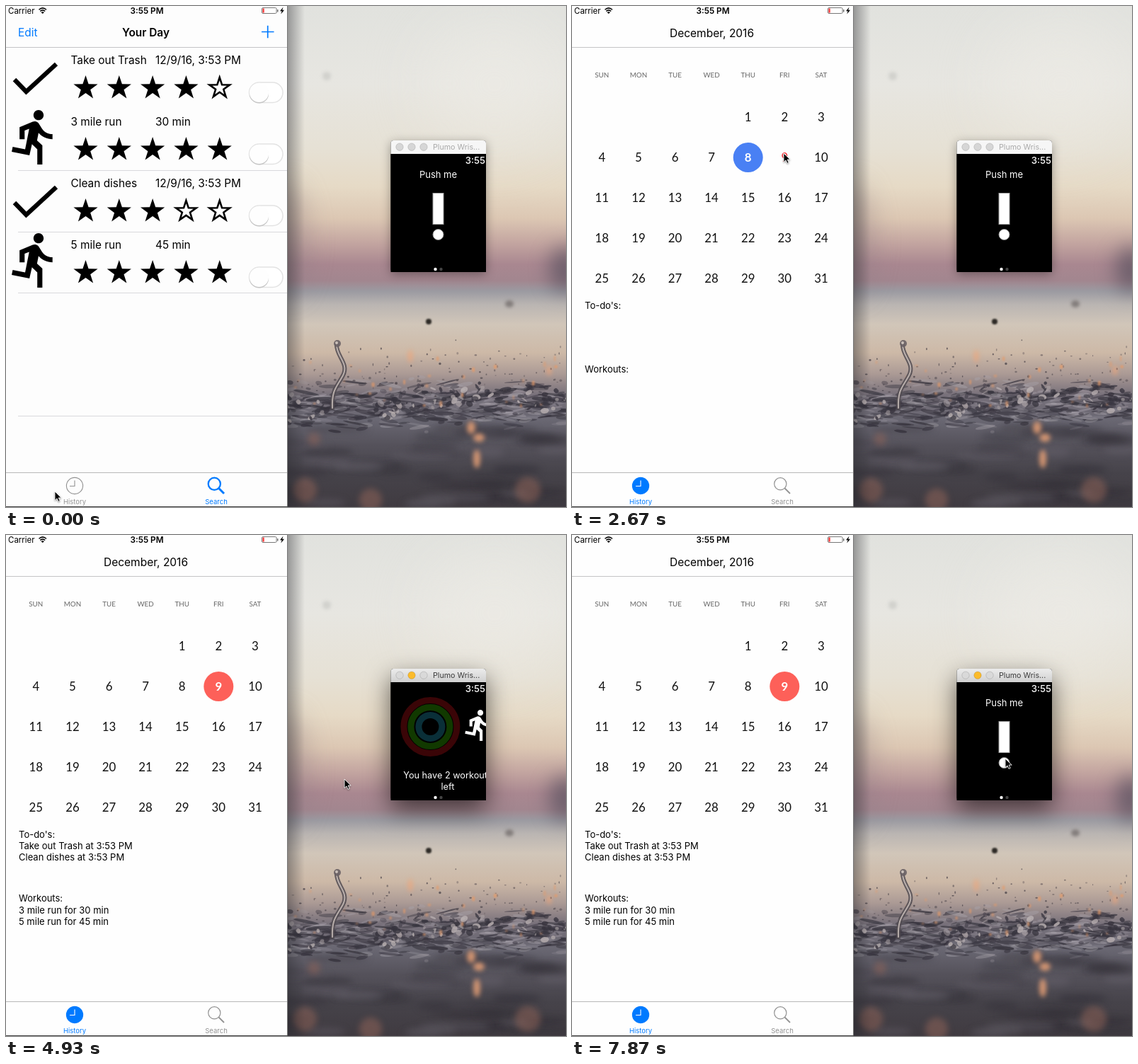
An HTML page with a canvas that plays this animation: 791 by 708 pixels, repeating every 7990 ms.

```html
<!DOCTYPE html>
<html lang="en">
<head>
<meta charset="utf-8">
<title>Day planner with watch</title>
<style>
html, body { margin: 0; width: 100%; height: 100%; overflow: hidden; }
canvas, svg { position: absolute; left: 0; top: 0; }
svg { font-family: Inter, "Liberation Sans", sans-serif; }
.mid { text-anchor: middle; }
.cal { font-family: Lato, sans-serif; }
#frame { filter: drop-shadow(0 3px 7px rgba(0,0,0,.35)); }
.active #frame { filter: drop-shadow(0 13px 17px rgba(0,0,0,.6)); }
.active #on, #off { display: inline; }
#on, .active #off { display: none; }
#cursor { filter: drop-shadow(0 1px 1px rgba(0,0,0,.4)); }
</style>
</head>
<body>
<canvas id="photo" width="791" height="708"></canvas>
<svg id="stage" width="791" height="708" viewBox="0 0 791 708"></svg>
<script>
const LOOP = 7990, PAGE = 134;
const BLUE = '#007aff', GREY = '#929292';
const $ = id => document.getElementById(id);

// ---------- backdrop ----------
function paintPhoto() {
  const c = $('photo').getContext('2d');
  let seed = 11;
  const rnd = (a = 0, b = 1) => {
    seed = (seed * 16807) % 2147483647;
    return a + (b - a) * seed / 2147483647;
  };
  const blob = (x, y, rx, ry, color, alpha = 1, blur = 0, turn = 0) => {
    c.globalAlpha = alpha;
    c.filter = blur ? `blur(${blur}px)` : 'none';
    c.fillStyle = color;
    c.beginPath();
    c.ellipse(x, y, rx, ry, turn, 0, 7);
    c.fill();
  };
  const sky = c.createLinearGradient(0, 0, 0, 708);
  [[0, '#e1e2de'], [110, '#e7e6e1'], [200, '#e6e1d5'], [255, '#e6dac6'], [300, '#dcc7b3'],
   [335, '#c3a5a0'], [365, '#a98790'], [388, '#a2868f'], [403, '#9b9aa1'], [422, '#bab5b2'],
   [450, '#d1c6b9'], [490, '#cdb9a7'], [520, '#ab9a95'], [550, '#77707a'], [585, '#696772'],
   [620, '#55525b'], [660, '#46434a'], [708, '#403b41']]
    .forEach(([y, color]) => sky.addColorStop(y / 708, color));
  c.fillStyle = sky;
  c.fillRect(397, 0, 394, 708);

  blob(690, 110, 100, 90, '#efeee8', .5, 40);
  blob(790, 372, 22, 32, '#59505e', .75, 14);
  blob(400, 330, 25, 80, '#8a7880', .4, 18);
  blob(453, 99, 6, 6, '#cfcfcb', .9, 2);
  blob(711, 421, 6, 5, '#77716f', .8, 2);
  blob(597, 446, 4, 4, '#2d2a26', 1, 1);

  // rippled water, denser and darker toward the splash line
  for (let i = 0; i < 380; i++) {
    const y = 565 + 38 * (rnd() + rnd() - 1) + rnd(-6, 6);
    const dark = rnd() < .62;
    blob(rnd(398, 791), y, rnd(3, 20), rnd(1, 3.2), dark ? '#35323c' : '#aaa5ad',
         dark ? rnd(.3, .75) : rnd(.15, .45), 0, rnd(-.25, .25));
  }
  for (let i = 0; i < 45; i++)
    blob(rnd(398, 791), rnd(595, 708), rnd(20, 55), rnd(3, 8), i % 3 ? '#302d35' : '#6b6771', rnd(.2, .45), 5);

  // splash mounds
  [[412, 565, 45], [540, 562, 22], [590, 552, 45], [655, 545, 30], [755, 550, 38]].forEach(([x, y, w]) => {
    for (let i = 0; i < 26; i++) {
      const dx = rnd(-1, 1);
      blob(x + dx * w, y + rnd(-22, 18) * (1 - dx * dx) + 5, rnd(1, 6), rnd(1, 4),
           i % 3 ? '#37343e' : '#b9b0b1', rnd(.4, .85), 0, rnd(-1, 1));
    }
  });
  // droplets and warm sparks
  for (let i = 0; i < 120; i++)
    blob(rnd(398, 791), 555 - 75 * rnd() * rnd() - rnd(0, 35), rnd(.6, 2), rnd(.6, 2), '#4b444a', rnd(.3, .8));
  for (let i = 0; i < 32; i++)
    blob(rnd(398, 791), rnd(490, 565), rnd(1, 2.6), rnd(1, 4), '#e89a66', rnd(.35, .75), 1);

  // rising jet
  c.filter = 'none';
  c.lineCap = 'round';
  [['#514a50', 6], ['#c9bfba', 2]].forEach(([color, w]) => {
    c.globalAlpha = .85;
    c.strokeStyle = color;
    c.lineWidth = w;
    c.stroke(new Path2D('M467 478C466 495 485 505 476 522S460 542 461 568'));
  });
  blob(468, 477, 5, 5, '#6a6265', .9);
  blob(467, 476, 2, 2, '#d6cbc3', .9);

  [[657, 596, 6, 9], [668, 610, 8, 6], [665, 640, 5, 13], [571, 495, 3, 9], [767, 515, 3, 7]]
    .forEach(([x, y, rx, ry]) => blob(x, y, rx, ry, '#f0a578', .8, 3));
  [[422, 684, 17], [515, 698, 16], [737, 684, 18], [435, 612, 9]]
    .forEach(([x, y, r]) => blob(x, y, r, r, '#94665a', .5, 4));

  // shade cast by the phone window
  c.globalAlpha = 1;
  c.filter = 'none';
  const shade = c.createLinearGradient(397, 0, 422, 0);
  shade.addColorStop(0, 'rgba(40,40,45,.42)');
  shade.addColorStop(1, 'rgba(40,40,45,0)');
  c.fillStyle = shade;
  c.fillRect(397, 0, 25, 708);
}

// ---------- markup helpers ----------
const range = n => [...Array(n).keys()];
const text = (x, y, s, size, attrs = '') => `<text x="${x}" y="${y}" font-size="${size}" ${attrs}>${s}</text>`;
const mid = (x, y, s, size, attrs = '') => text(x, y, s, size, `text-anchor="middle" ${attrs}`);
const path = (d, attrs = '') => `<path d="${d}" ${attrs}/>`;
const line = (d, color, w) => path(d, `fill="none" stroke="${color}" stroke-width="${w}"`);
const rect = (x, y, w, h, attrs = '') => `<rect x="${x}" y="${y}" width="${w}" height="${h}" ${attrs}/>`;
const circle = (x, y, r, attrs = '') => `<circle cx="${x}" cy="${y}" r="${r}" ${attrs}/>`;
const group = (id, s) => `<g id="${id}">${s}</g>`;

const runner = (x, y, k, color) => path('M13.49 5.48c1.1 0 2-.9 2-2s-.9-2-2-2-2 .9-2 2 .9 2 2 2zm-3.6 13.9l1-4.4 2.1 2v6h2v-7.5l-2.1-2 .6-3c1.3 1.5 3.3 2.5 5.5 2.5v-2c-1.9 0-3.5-1-4.3-2.4l-1-1.6c-.4-.6-1-1-1.7-1-.3 0-.5.1-.8.1l-5.2 2.2v4.7h2v-3.4l1.8-.7-1.6 8.1-4.9-1-.4 2 7 1.4z',
  `transform="translate(${x} ${y}) scale(${k})" fill="${color}"`);

function star(x, y, full) {
  const R = full ? 18 : 15;
  const pts = range(10).map(i => {
    const a = i * Math.PI / 5, r = i % 2 ? R * .39 : R;
    return (x + r * Math.sin(a)).toFixed(1) + ',' + (y - r * Math.cos(a)).toFixed(1);
  });
  return `<polygon points="${pts.join(' ')}" ${full ? '' : 'fill="#fff" stroke="#000" stroke-width="2.6"'}/>`;
}

function tabs(history) {
  const [h, s] = history ? [BLUE, GREY] : [GREY, BLUE];
  return line('M0 659.5H397', '#b8b8b8', 1) +
    circle(97, 678, 11.6, `fill="${history ? BLUE : 'none'}" stroke="${h}" stroke-width="1.1"`) +
    line('M97 670.5V678.5H90', history ? '#fff' : GREY, 1.1) +
    circle(294.3, 675.3, 8.6, `fill="none" stroke="${s}" stroke-width="${history ? 1.2 : 2.3}"`) +
    line('M300.5 681.5L308 689', s, history ? 1.8 : 3) +
    mid(97, 704, 'History', 9.5, `fill="${h}"`) + mid(297, 704, 'Search', 9.5, `fill="${s}"`);
}

function row(i, [title, detail, score, run]) {
  const y = 87 * i;
  return (run ? runner(-2.3, y + 54.7, 3.58, '#000') : line(`M12 ${y + 104}L28.5 ${y + 121}L71 ${y + 82}`, '#000', 6.3)) +
    text(91.5, y + 82, title, 15.4) + text(211, y + 82, detail, 15.4) +
    range(5).map(s => star(112.5 + 47.3 * s, y + 116, s < score)).join('') +
    rect(343.5, y + 108, 47.5, 28.5, 'rx="14.2" fill="#fff" stroke="#e3e3e3" stroke-width="1.5"') +
    circle(357.5, y + 124, 13.6, 'fill="#c4c4c4"') + circle(357.5, y + 122.3, 13.6, 'fill="#fefefe"');
}

const list = rect(0, 0, 397, 708, 'fill="#fdfdfd"') +
  text(17, 42.5, 'Edit', 15.4, `fill="${BLUE}"`) +
  mid(197.5, 42.5, 'Your Day', 15.4, 'font-weight="600"') +
  line('M361 36.5H378.5M369.7 27.7V45.3', BLUE, 1.7) +
  [['Take out Trash', '12/9/16, 3:53 PM', 4], ['3 mile run', '30 min', 5, 1],
   ['Clean dishes', '12/9/16, 3:53 PM', 3], ['5 mile run', '45 min', 5, 1]].map((r, i) => row(i, r)).join('') +
  [232, 319, 405, 579].map(y => line(`M17 ${y + .5}H397`, '#d9d9dc', 1)).join('') + tabs(false);

const col = c => 42.3 + 51.6 * c;
function month(picked) {
  return range(31).map(i => {
    const d = i + 1, x = col((i + 4) % 7), y = 157 + 57 * Math.floor((i + 4) / 7), on = d === picked;
    const color = on ? '#fff' : d === 9 ? '#fb2d33' : '#111';
    return (on ? circle(x, y, 21, `fill="${d === 9 ? '#fd6059' : '#4980f4'}"`) : '') +
      mid(x, y + 6, d, 16.8, `class="cal" fill="${color}" ${on ? 'font-weight="700"' : ''}`);
  }).join('');
}
const calendar = rect(0, 0, 397, 708, 'fill="#fefefe"') +
  mid(197.5, 43.5, 'December, 2016', 15.5) +
  ['SUN', 'MON', 'TUE', 'WED', 'THU', 'FRI', 'SAT'].map((d, i) => mid(col(i), 100.5, d, 9.8, 'class="cal" fill="#666"')).join('') +
  text(18, 427.5, "To-do's:", 13) + text(18, 518, 'Workouts:', 13) +
  group('day8', month(8)) +
  group('day9', month(9) + text(18, 444, 'Take out Trash at 3:53 PM', 13) + text(18, 460, 'Clean dishes at 3:53 PM', 13) +
    text(18, 535, '3 mile run for 30 min', 13) + text(18, 551, '5 mile run for 45 min', 13)) + tabs(true);

const status = text(3, 11, 'Carrier', 11.5) + mid(199, 11, '3:55 PM', 11.8, 'font-weight="600"') +
  line('M46.5 5.2Q51.7 .6 57 5.2M48.3 7.4Q51.7 4.4 55.2 7.4', '#000', 1.5) + path('M49.6 9L51.7 11L53.9 9Q51.7 7.2 49.6 9') +
  rect(361.5, 2.5, 20.5, 8, 'rx="1.5" fill="#fff" stroke="#777"') + rect(362.5, 3.5, 2.2, 6, 'fill="#f33"') +
  rect(383, 5, 1.5, 3.5, 'fill="#777"') + path('M391.5 1.5L387 7.2H389.6L388.3 11.5L393 5.7H390.2Z') +
  line('M0 58.5H397', '#c4c4c6', 1) + line('M397.5 0V708', '#777', 1) + line('M0 707.5H398', '#444', 1);

const bar = (fill, buttons, color) => path('M543.5 209V194Q543.5 190 547.5 190H674Q678 190 678 194V209Z', `fill="${fill}"`) +
  buttons.map((b, i) => circle(556 + 17 * i, 199.2, 5.2, `fill="${b}" stroke="rgba(0,0,0,.13)"`)).join('') +
  text(603, 203, 'Plumo Wris...', 10.7, `fill="${color}"`);
const ring = (r, color, w) => circle(586, 272, r, `fill="none" stroke="${color}" stroke-width="${w}"`);
const watch = rect(543.5, 190, 134.5, 186, 'id="frame" rx="4"') +
  group('off', bar('#f6f6f6', ['#d6d6d6', '#d6d6d6', '#d6d6d6'], '#a9a9a9')) +
  group('on', bar('url(#metal)', ['#d9d9d9', '#fbbb2b', '#d9d9d9'], '#3c3c3c')) +
  rect(543.5, 209, 134.5, 167) +
  '<g clip-path="url(#screen)" fill="#fff">' +
  group('push', mid(610.5, 243, 'Push me', 13) +
    rect(603, 264.5, 15, 44, 'stroke="#999"') + circle(610.5, 323, 7.5, 'stroke="#999"')) +
  group('rings', ring(37.5, '#3a0507', 9) + ring(27.5, '#113900', 9) + ring(16.5, '#0a2f38', 9) +
    runner(629, 245, 2.05, '#fff') + mid(610.5, 345, 'You have 2 workouts', 12.7) + mid(610.5, 361, 'left', 12.7)) +
  text(677, 223, '3:55', 13.2, 'text-anchor="end" font-weight="500"') +
  circle(606.5, 372, 2.2, 'id="dot0"') + circle(614.5, 372, 2.2, 'id="dot1"') + '</g>';

$('stage').innerHTML = `<defs>
  <clipPath id="screen">${rect(543.5, 209, 134.5, 167)}</clipPath>
  <linearGradient id="metal" x2="0" y2="1"><stop stop-color="#ececec"/><stop offset="1" stop-color="#d0d0d0"/></linearGradient>
  </defs>` + group('list', list) + group('calendar', calendar) + status + group('watch', watch) +
  path('M0 0V12.6L3 9.9L5 14.4L7.2 13.4L5.2 9H9.2Z', 'id="cursor" stroke="#fff" stroke-width=".9"');

// ---------- motion ----------
// screen refreshes: first time, last time, count
const bursts = [[110, 110, 1], [310, 430, 2], [720, 1490, 8], [1610, 2080, 5], [2290, 2520, 3], [2670, 3380, 7],
  [3500, 3820, 4], [3970, 4440, 5], [4580, 5280, 7], [5400, 6090, 7], [6210, 6570, 4], [6810, 7520, 7], [7640, 7870, 3]];
function refresh(t) {
  const b = bursts.filter(b => b[0] <= t).pop();
  if (!b) return 0;
  const [from, to, n] = b, step = (to - from) / (n - 1) || 1;
  return from + step * Math.min(n - 1, Math.floor((t - from) / step));
}

const pointer = [[0, 69, 686], [110, 91, 675], [720, 92, 672], [940, 264, 243], [1070, 276, 247], [1490, 21, 428],
  [1850, 60, 538], [2080, 250, 168], [2290, 247, 209], [2520, 247, 211], [2670, 299, 208], [2905, 299, 208],
  [3380, 606, 300], [3740, 615, 202], [4200, 652, 300], [4440, 623, 345], [4580, 623, 345], [4930, 478, 345],
  [5280, 540, 353], [5400, 545, 360], [5740, 529, 407], [6090, 576, 360], [6570, 582, 339], [6810, 640, 340],
  [6925, 704, 338], [7045, 716, 338], [7520, 619, 350], [7870, 612, 316]];
const slide = [[4580, 0], [4700, .2], [4930, .9], [5160, 1], [6810, 1], [6925, .731], [7045, .22], [7165, .04], [7285, 0]];

function at(keys, t) {
  const i = keys.findIndex(k => k[0] > t);
  if (i < 0) return keys[keys.length - 1].slice(1);
  if (!i) return keys[0].slice(1);
  const a = keys[i - 1], b = keys[i], f = (t - a[0]) / (b[0] - a[0]);
  return a.slice(1).map((v, j) => v + (b[j + 1] - v) * f);
}
const show = (id, on) => $(id).setAttribute('display', on ? 'inline' : 'none');
const move = (id, x, y) => $(id).setAttribute('transform', `translate(${x} ${y})`);

function draw(now) {
  const t = refresh(now % LOOP);
  const history = t >= 310, eighth = t >= 2290 && t < 2900, active = t >= 3600;
  show('list', !history);
  show('calendar', history);
  show('day8', eighth);
  show('day9', !eighth);
  $('watch').setAttribute('class', active ? 'active' : '');
  move('watch', 0, active ? -1 : 0);
  const [p] = at(slide, t), second = t >= 5400 && t < 7640;
  move('push', -PAGE * p, 0);
  move('rings', PAGE * (1 - p), 0);
  $('dot0').setAttribute('fill', second ? '#444' : '#fff');
  $('dot1').setAttribute('fill', second ? '#fff' : '#444');
  move('cursor', ...at(pointer, t));
}

paintPhoto();
const start = performance.now();
(function tick() {
  draw(performance.now() - start);
  requestAnimationFrame(tick);
})();
</script>
</body>
</html>
```
